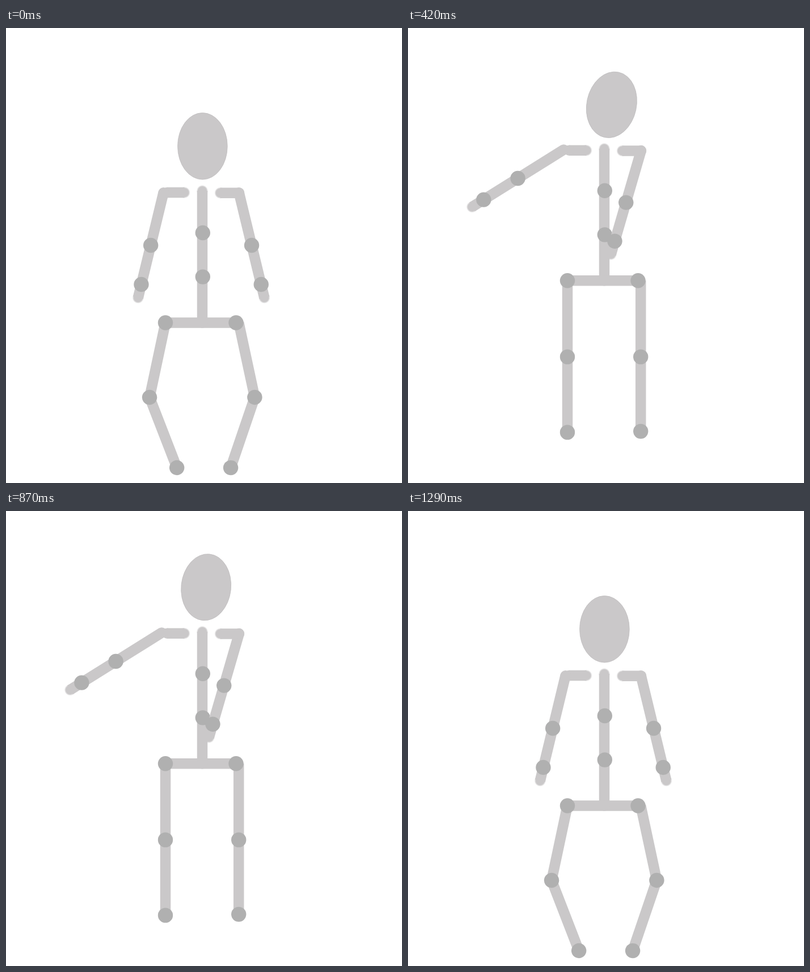
An HTML page for the animation above (1.32 s loop, 698 by 802 pixels).

```html
<!DOCTYPE html>
<html lang="en">
<head>
<meta charset="utf-8">
<title>Jumping figure</title>
<style>
  html, body { margin: 0; width: 100%; height: 100%; overflow: hidden; background: #fff; }
  svg { display: block; width: 698px; height: 802px; }
  .bone { stroke: #cac8c9; stroke-width: 18.5; }
  .dot { fill: #cac8c9; }
  .joint { fill: #b0b0b0; }
  .head { fill: #cac8c9; stroke: #bfbdbe; stroke-width: .8; }
</style>
</head>
<body>
<svg viewBox="0 0 698 802">
  <defs>
    <radialGradient id="soft">
      <stop offset=".72" stop-color="#cac8c9"/>
      <stop offset="1" stop-color="#cac8c9" stop-opacity="0"/>
    </radialGradient>
  </defs>
  <g id="body"></g>
</svg>
<script>
const LOOP = 1320, STEP = 30, LAST = LOOP - STEP;
const MID = 346.4, HIP = 519.5, SHOULDER = 290.3, NECK = 268.3;

const body = document.getElementById('body');

function add(parent, tag, attrs = {}) {
  const el = document.createElementNS('http://www.w3.org/2000/svg', tag);
  for (const k in attrs) el.setAttribute(k, attrs[k]);
  return parent.appendChild(el);
}
const bone = (parent, x1, y1, x2, y2) => add(parent, 'line', { x1, y1, x2, y2, class: 'bone' });
const joint = (parent, cx, cy) => add(parent, 'circle', { cx, cy, r: 13.2, class: 'joint' });

// Bone with a firm round start and a faded round end
function limb(parent, x1, y1, x2, y2) {
  bone(parent, x1, y1, x2, y2);
  add(parent, 'circle', { cx: x1, cy: y1, r: 9.25, class: 'dot' });
  add(parent, 'circle', { cx: x2, cy: y2, r: 10.2, fill: 'url(#soft)' });
}

function rotate(el, angle, x, y) {
  el.setAttribute('transform', `rotate(${angle} ${x} ${y})`);
}

// A thigh group that holds a shin group
function makeLeg(x, shin, thighTurn, shinTurn) {
  const knee = HIP + 134.4, ankle = knee + shin;
  const upper = add(body, 'g');
  bone(upper, x, HIP, x, knee);
  const lower = add(upper, 'g');
  bone(lower, x, knee, x, ankle);
  joint(lower, x, ankle);
  joint(upper, x, knee);
  return bend => {
    rotate(upper, thighTurn * bend, x, HIP);
    rotate(lower, (shinTurn - thighTurn) * bend, x, knee);
  };
}

// A straight arm that swings rigidly; side is -1 (left) or 1 (right)
function makeArm(side, px, py, turn) {
  const arm = add(body, 'g'), x = 344.1 + side * 66.5, lean = 13.6 * Math.PI / 180;
  const along = d => [x + side * d * Math.sin(lean), SHOULDER + d * Math.cos(lean)];
  limb(arm, ...along(0), ...along(190.5));
  joint(arm, ...along(95.4));
  joint(arm, ...along(166.4));
  return reach => rotate(arm, turn * reach, px, py);
}

const legs = [makeLeg(281, 133, 12, -21.2), makeLeg(410.2, 131.2, -12.1, 18.8)];

bone(body, 281, HIP, 405.5, HIP);
limb(body, 346, HIP, 346, 287);
joint(body, 281, HIP);
joint(body, 405.5, HIP);
joint(body, 346.8, 361);
joint(body, 346.8, 438.6);

limb(body, 284, 290, 314.5, 290);
limb(body, 411, 290.7, 377.5, 290.7);

const arms = [makeArm(-1, 278, 285.7, 88.8), makeArm(1, 410.8, 290.8, 59.6)];

const head = add(body, 'ellipse', { cx: MID, cy: 208.3, rx: 43.8, ry: 58.7, class: 'head' });

// 0 before a, 1 after b, even in between
const ramp = (t, a, b) => Math.min(1, Math.max(0, (t - a) / (b - a)));

function draw(ms) {
  const t = Math.floor((ms % LOOP) / STEP) * STEP;
  const u = Math.min(t, LAST - t); // the landing mirrors the take-off
  const stand = ramp(u, 0, 300), leap = ramp(u, 300, 540), float = ramp(u, 540, 630);
  const tilt = 24 * ramp(t, 300, 540) - 12 * ramp(t, 540, 750) - 12 * ramp(t, 750, 990);

  body.setAttribute('transform', `translate(0 ${-(30 * stand + 88.5 * leap + 23.5 * float)})`);
  legs.forEach(pose => pose(1 - stand));
  arms.forEach(pose => pose(leap));
  rotate(head, tilt, MID, NECK);
}

const begin = performance.now();
function tick() {
  draw(performance.now() - begin);
  requestAnimationFrame(tick);
}
tick();
</script>
</body>
</html>
```
